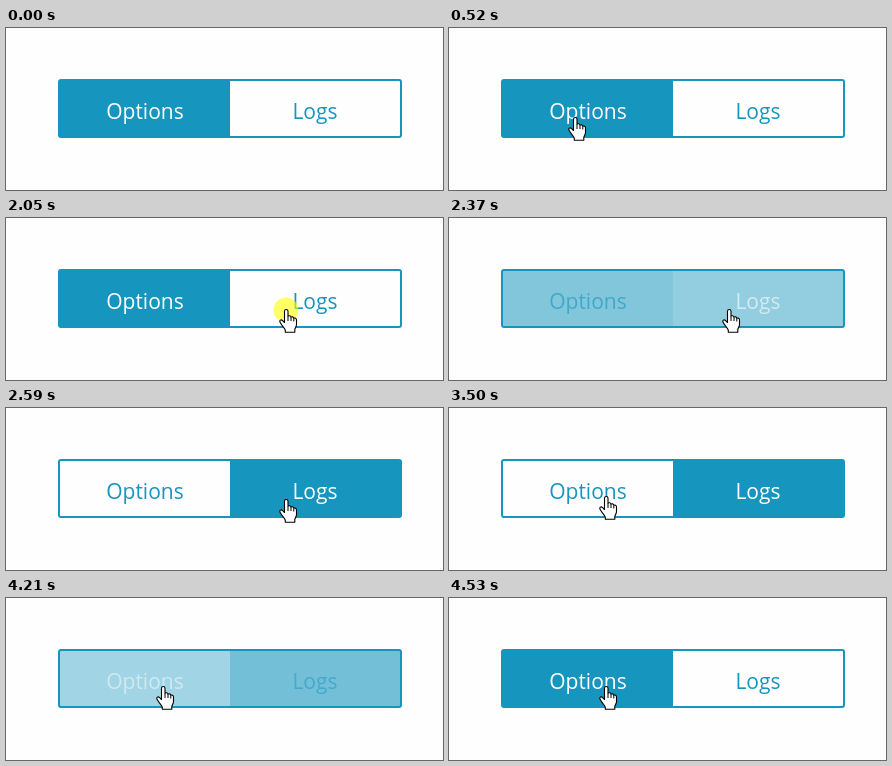
These frames come from a looping animation (437 px wide and 162 px high, 6980 ms). An HTML page:

```html
<!DOCTYPE html>
<html lang="en">
<head>
<meta charset="utf-8">
<title>Tab toggle</title>
<style>
  html, body { margin: 0; width: 100%; height: 100%; overflow: hidden; background: #fefefe; }
  svg { display: block; width: 437px; height: 162px; }
  :root { --teal: #1695be; --white: #fefefe; }

  .frame { fill: none; stroke: var(--teal); stroke-width: 2; }
  .options { --on: var(--teal); --off: var(--white); }
  .logs { --on: var(--white); --off: var(--teal); }
  .tab rect { fill: var(--on); animation: fill 6980ms linear infinite; }
  .tab text {
    fill: var(--off);
    font: 21px "Open Sans", "Noto Sans", sans-serif;
    text-anchor: middle;
    animation: ink 6980ms linear infinite;
  }

  .x { animation: move-x 6980ms linear infinite; }
  .y { animation: move-y 6980ms linear infinite; }
  .click { fill: #ff0; fill-opacity: .6; opacity: 0; animation: click 6980ms step-end infinite; }
  .hand { fill: #fff; stroke: #000; stroke-width: 1.1; stroke-linejoin: round; }
  .knuckles { fill: none; stroke: #000; stroke-width: 1; }

  /* Tab colours: swap, then swap back with a short pause on the way */
  @keyframes fill {
    0% { fill: var(--on); }
    30.659% { fill: var(--on); animation-timing-function: cubic-bezier(.4, .1, .7, .9); }
    37.106%, 57.02% { fill: var(--off); }
    60.315%, 61.748% { fill: color-mix(in srgb, var(--on) 40%, var(--off)); }
    64.9%, 100% { fill: var(--on); }
  }
  @keyframes ink {
    0% { fill: var(--off); }
    30.659% { fill: var(--off); animation-timing-function: ease; }
    37.106%, 57.02% { fill: var(--on); }
    60.315% { fill: color-mix(in srgb, var(--off) 80%, var(--on)); }
    61.748% { fill: color-mix(in srgb, var(--off) 80%, var(--on)); animation-timing-function: ease-out; }
    64.9%, 100% { fill: var(--off); }
  }

  @keyframes move-x {
    0% { transform: translateX(243px); }
    1.433% { transform: translateX(243px); animation-timing-function: ease-out; }
    5.444% { transform: translateX(91px); animation-timing-function: ease-in-out; }
    7.45% { transform: translateX(119px); }
    15.33% { transform: translateX(119px); animation-timing-function: ease-in-out; }
    17.479% { transform: translateX(273px); }
    44.986% { transform: translateX(273px); animation-timing-function: ease-in-out; }
    50.143%, 100% { transform: translateX(150px); }
  }
  @keyframes move-y {
    0% { transform: translateY(200px); animation-timing-function: step-end; }
    1.433% { transform: translateY(148px); animation-timing-function: ease-out; }
    7.45%, 15.33% { transform: translateY(89px); }
    16.619% { transform: translateY(94px); }
    17.479% { transform: translateY(91px); }
    44.986% { transform: translateY(91px); animation-timing-function: ease-in-out; }
    50.143%, 100% { transform: translateY(88px); }
  }
  @keyframes click {
    0%, 30.659%, 57.02%, 100% { opacity: 0; }
    29.37%, 55.731% { opacity: 1; }
  }
</style>
</head>
<body>
<svg viewBox="0 0 437 162">
  <g class="tab options">
    <rect x="54" y="53" width="170" height="55"/>
    <text x="139" y="91">Options</text>
  </g>
  <g class="tab logs">
    <rect x="224" y="53" width="170" height="55"/>
    <text x="309" y="91">Logs</text>
  </g>
  <rect class="frame" x="53" y="52" width="342" height="57" rx="2"/>
  <g class="x"><g class="y">
    <circle class="click" cx="7" cy="1" r="12.5"/>
    <path class="hand" d="M5.5 2.2C5.5 -.1 9 -.1 9 2.2V7.3C9.6 6.4 11.9 6.6 12 8.2C12.8 7.4 14.6 7.8 14.8 9.2C16 8.6 17.5 9.3 17.5 11V15.5C17.5 18 16 18.8 15.8 20.5V23.3H6.3V21.2C5.5 19 3.2 17.3 1.2 13.6C0 11.4 2 10 3.6 11.6L5.5 13.5Z"/>
    <path class="knuckles" d="M9 7.3V12M12 8.2V12M14.8 9.2V12.5"/>
  </g></g>
</svg>
</body>
</html>
```
